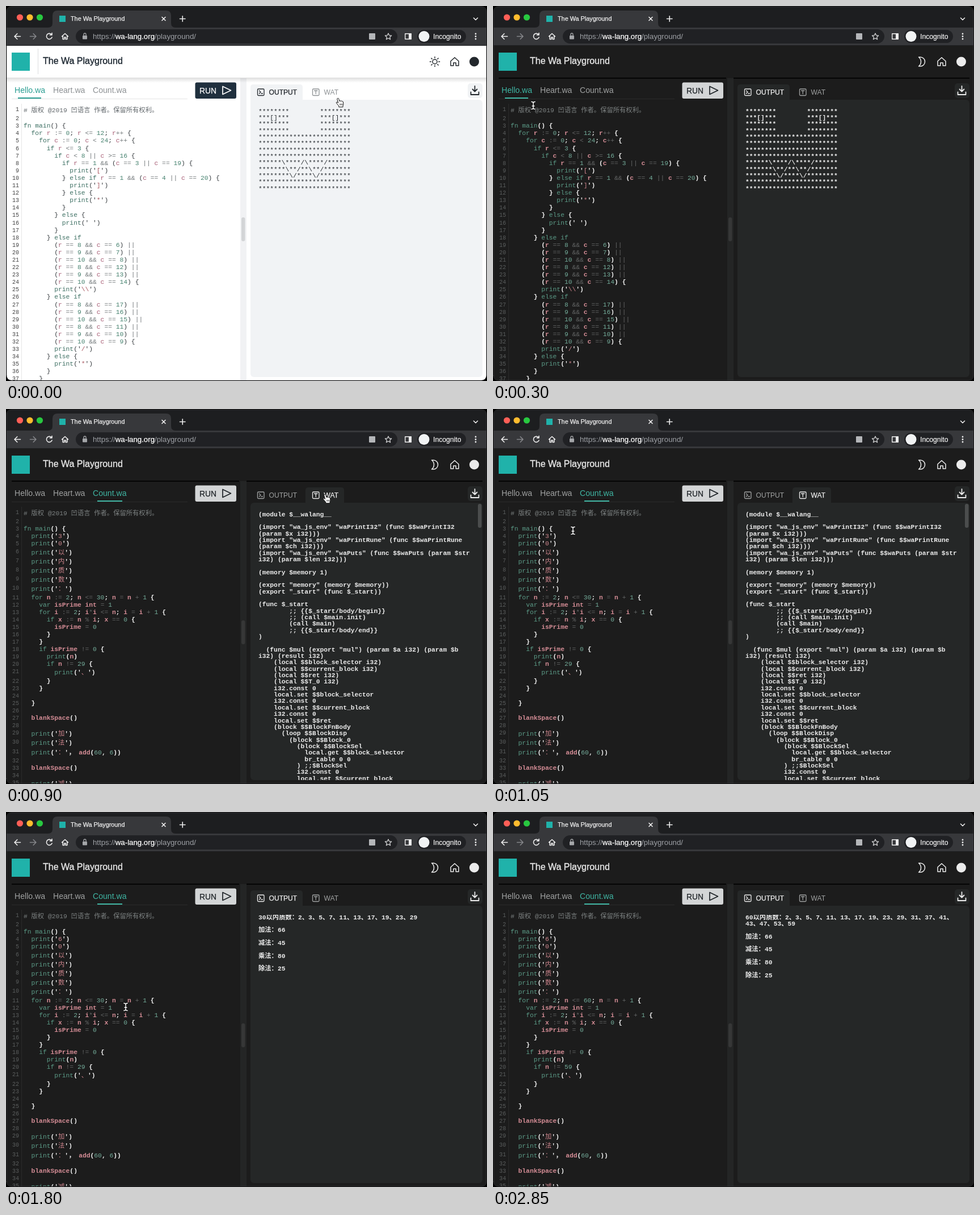
An HTML page for the animation above (3 s loop, 848x660 px).

```html
<!DOCTYPE html>
<html lang="en">
<head>
<meta charset="utf-8">
<title>The Wa Playground</title>
<style>
html, body { margin: 0; width: 100%; height: 100%; overflow: hidden; background: #000; }
#stage {
  position: relative; width: 848px; height: 660px; overflow: hidden; background: #000;
  --page: #fff; --gut: #f1f2f4; --panel: #f1f3f5; --handle: #d3d5d7; --ink: #22272c; --title: #1f2933;
  --dim: #8d9194; --accent: #2a9d92; --run: #20303e; --runInk: #fff; --rule: #e6e6e6;
  --num: #444; --com: #62686c; --key: #3c6f62; --id: #a65a72; --int: #46826f; --op: #72787a;
  --str: #a8525c; --pun: #33383c; --strong: 400;
}
#stage.dark {
  --page: #1c1c1c; --gut: #242525; --panel: #252727; --handle: #363737; --ink: #ececec; --title: #e6e6e6;
  --dim: #a0a2a2; --accent: #3fb5a3; --run: #d3d5d6; --runInk: #1d2226; --rule: #2b2b2b;
  --num: #5b5e5e; --com: #7d8282; --key: #5c9c88; --id: #d58d96; --int: #74ad9b; --op: #646666;
  --str: #cf858d; --pun: #f0f0f0; --strong: 700;
}
svg { position: absolute; left: 0; top: 0; }
svg text { font-family: "Liberation Sans", Arial, sans-serif; white-space: pre; }
.moon { display: none; }
.dark .light { display: none; } .dark .moon { display: inline; }
.line { fill: none; stroke-linecap: round; stroke-linejoin: round; }
#code, #out {
  position: absolute; overflow: hidden; white-space: pre;
  font: 11.3px "Liberation Mono", "Noto Sans CJK SC", "Noto Sans CJK", monospace;
}
#code { left: 0; top: 176px; width: 412px; height: 483px; }
#code div { position: relative; padding-left: 31px; height: 13.1px; line-height: 13.1px; }
#code div.tall { height: 16.2px; line-height: 16px; }
#code i { position: absolute; left: 0; width: 23px; text-align: right; font-style: normal; font-size: 10px; color: var(--num); }
#code .tall i { line-height: 14px; }
#out {
  left: 445px; top: 180.5px; width: 388px; height: 472px; line-height: 11.34px;
  color: var(--ink); font-weight: var(--strong);
}
.com { color: var(--com); } .key { color: var(--key); } .int { color: var(--int); }
.op { color: var(--op); } .str { color: var(--str); }
.id { color: var(--id); font-weight: var(--strong); }
.pun { color: var(--pun); font-weight: var(--strong); }
</style>
</head>
<body>
<div id="stage">
<svg width="848" height="660" viewBox="0 0 848 660">
  <defs>
    <clipPath id="win"><rect x="1" y="1" width="846" height="658" rx="9"/></clipPath>
    <linearGradient id="fade" x2="0" y2="1">
      <stop offset="0" stop-color="#000" stop-opacity=".13"/><stop offset="1" stop-color="#000" stop-opacity="0"/>
    </linearGradient>
  </defs>
  <g clip-path="url(#win)">
    <rect width="848" height="70" fill="#1d1e20"/>
    <path d="M74 38q8 0 8-8V17q0-9 9-9h191q9 0 9 9v13q0 8 8 8h549v31H0V38z" fill="#37383b"/>
    <circle cx="24.5" cy="20" r="5.6" fill="#ff5f57"/>
    <circle cx="42" cy="20" r="5.6" fill="#febc2e"/>
    <circle cx="59.5" cy="20" r="5.6" fill="#28c840"/>
    <rect x="94" y="17" width="11" height="11" fill="#20b2aa"/>
    <text x="114" y="26" font-size="10.85" fill="#f4f4f4" stroke="#f4f4f4" stroke-width=".25">The Wa Playground</text>
    <g class="line" stroke="#eee" stroke-width="1.6">
      <path d="M275 19.5l6 6m0-6l-6 6M306.5 22.5h9.5m-4.75-4.75v9.5M824.5 21l3.5 3.5 3.5-3.5"/>
      <path d="M25.5 53.5h-10.500m4.800-4.800l-4.800 4.800 4.800 4.800"/>
      <path d="M42.5 53.5h10.500m-4.800-4.800l4.800 4.800-4.800 4.800" stroke="#85868a"/>
      <path d="M80.5 50.500a5 5 0 1 0 .6 4.500M81 47.500v3.500h-3.500"/>
      <path d="M98.5 53.500l5.500-5 5.500 5m-9.300-1v6h2.600v-3.500h2.400v3.500h2.600v-6"/>
    </g>
    <rect x="123" y="41" width="567" height="25" rx="12.5" fill="#202124"/>
    <rect x="135" y="52" width="8" height="6.5" rx="1" fill="#a4a6a9"/>
    <path d="M137 52v-2a2 2 0 0 1 4 0v2" class="line" stroke="#a4a6a9" stroke-width="1.3"/>
    <text x="153" y="58" font-size="13.26" fill="#9ea1a6">https://<tspan fill="#fff" stroke="#fff" stroke-width=".25">wa-lang.org</tspan>/playground/</text>
    <rect x="640" y="48" width="11" height="11" rx="1" fill="#b4b6b9"/>
    <path d="M674 48l1.7 3.7 4 .4-3 2.7.9 4-3.6-2.1-3.6 2.1.9-4-3-2.700 4-.4z" class="line" stroke="#d8d9da" stroke-width="1.2"/>
    <rect x="703.7" y="48.7" width="10.6" height="9.6" class="line" stroke="#eee" stroke-width="1.4"/>
    <path d="M710 48.5h4.5v10h-4.5z" fill="#eee"/>
    <rect x="725" y="42" width="86" height="23" rx="11.5" fill="#202124"/>
    <circle cx="737" cy="53.5" r="9.5" fill="#f1f3f4"/>
    <text x="753" y="58" font-size="12.2" fill="#f4f4f4" stroke="#f4f4f4" stroke-width=".2">Incognito</text>
    <g fill="#eee"><circle cx="828" cy="49" r="1.4"/><circle cx="828" cy="53.5" r="1.4"/><circle cx="828" cy="58" r="1.4"/></g>

    <rect y="70" width="848" height="590" fill="var(--page)"/>
    <rect x="413" y="127" width="11" height="533" fill="var(--gut)"/>
    <rect class="light" y="126" width="848" height="9" fill="url(#fade)"/>
    <path class="moon" d="M10 127h401M424 127h416" stroke="#050505" stroke-width="2"/>
    <rect x="10" y="82" width="32" height="32" fill="#20b2aa"/>
    <path class="light" d="M56.5 75v45" stroke="#dcdedf"/>
    <text x="65" y="102" font-size="16" fill="var(--title)" stroke="var(--title)" stroke-width=".4">The Wa Playground</text>
    <g class="line" stroke="var(--ink)" stroke-width="1.5">
      <g class="light"><circle cx="756" cy="98" r="4"/><path id="rays"/></g>
      <path class="moon" d="M750.5 90h3a8 8 0 0 1 0 16h-3a10 10 0 0 0 0-16z"/>
      <path d="M784 97l7-6.3 7 6.3v8h-4.800v-5h-4.400v5h-4.800z"/>
    </g>
    <circle cx="825.5" cy="98" r="8.5" fill="var(--ink)"/>

    <path d="M10 163.5h310" stroke="var(--rule)"/>
    <path d="M27.5 172v488" stroke="var(--rule)"/>
    <g id="files" font-size="14.1"></g>
    <rect id="under" y="161" height="2" fill="var(--accent)"/>
    <rect x="333.5" y="134.5" width="72.5" height="28.5" rx="3" fill="var(--run)"/>
    <text x="341" y="153.5" font-size="13.9" fill="var(--runInk)" stroke="var(--runInk)" stroke-width=".25">RUN</text>
    <path d="M382 141.5v14l14.5-7z" class="line" stroke="var(--runInk)" stroke-width="1.7"/>
    <rect x="415" y="372" width="6.5" height="42" rx="3" fill="var(--handle)"/>

    <rect x="431" y="165" width="409" height="488" rx="6" fill="var(--panel)"/>
    <path id="pane" fill="var(--panel)"/>
    <g id="views" font-size="12.1"></g>
    <rect x="814" y="136" width="26" height="26" rx="5" fill="var(--panel)"/>
    <path d="M826.5 141v9.500m-4-4l4 4 4-4M819.5 151.500v4.500h14v-4.500" class="line" stroke="var(--ink)" stroke-width="1.8"/>
    <rect id="bar" x="832" y="167" width="6.5" height="42" rx="3" fill="#4b4d4d"/>
  </g>
</svg>
<div id="code"></div>
<div id="out"></div>
<svg width="848" height="660" viewBox="0 0 848 660">
  <path d="M1 651v-641q0-9 9-9h828q9 0 9 9v640q0 9-9 9H10q-9 0-9-9z" fill="none" stroke="#4a4b4d" stroke-opacity=".55"/>
  <g id="hand">
    <path d="M-3.5-7.500q1.700-.8 2.200.9l1.100 4q1.200-1.200 2.300 0 1.400-.9 2.300.4 1.600-.5 2 1.100l.4 3.300q.1 1.900-.8 3.300v2.300H-1.200v-1.900l-4-4.700q-1.300-1.900.5-2.300l2.300 1.600-1.800-6.600q-.2-1 .7-1.400z" fill="#fff" stroke="#111"/>
    <path d="M.8 1.800v3m2-3v3m2-3v3" stroke="#111" stroke-width=".8"/>
  </g>
  <g id="beam" class="line"></g>
</svg>
</div>
<script>
const $ = id => document.getElementById(id);
const esc = s => s.replace(/&/g, '&amp;').replace(/</g, '&lt;');
const HEAD = '# 版权 @2019 凹语言 作者。保留所有权利。\n\nfn main() {\n';

const marks = rows => rows.map(([r, c], i) =>
  `        (r == ${r} && c == ${c}) ` + (i < rows.length - 1 ? '||' : '{')).join('\n');
const backs = [[8, 6], [9, 7], [10, 8], [8, 12], [9, 13], [10, 14]];
const slashes = [[8, 17], [9, 16], [10, 15], [8, 11], [9, 10], [10, 9]];

const hello = HEAD + `  for r := 0; r <= 12; r++ {
    for c := 0; c < 24; c++ {
      if r <= 3 {
        if c < 8 || c >= 16 {
          if r == 1 && (c == 3 || c == 19) {
            print('[')
          } else if r == 1 && (c == 4 || c == 20) {
            print(']')
          } else {
            print('*')
          }
        } else {
          print(' ')
        }
      } else if
${marks(backs)}
        print('\\\\')
      } else if
${marks(slashes)}
        print('/')
      } else {
        print('*')
      }
    }`;

const count = (tens, limit, last) => HEAD +
  [tens, '0', ...'以内质数：'].map(c => `  print('${c}')\n`).join('') +
`  for n := 2; n <= ${limit}; n = n + 1 {
    var isPrime int = 1
    for i := 2; i*i <= n; i = i + 1 {
      if x := n % i; x == 0 {
        isPrime = 0
      }
    }
    if isPrime != 0 {
      print(n)
      if n != ${last} {
        print('、')
      }
    }

  }

  blankSpace()

  print('加')
  print('法')
  print('：'， add(60, 6))

  blankSpace()

  print('减')`;

function face() {
  const has = (list, r, c) => list.some(p => p[0] === r && p[1] === c);
  const cell = (r, c) => {
    if (r < 4 && c > 7 && c < 16) return ' ';
    if (r === 1 && c % 16 === 3) return '[';
    if (r === 1 && c % 16 === 4) return ']';
    return has(backs, r, c) ? '\\' : has(slashes, r, c) ? '/' : '*';
  };
  return Array.from({ length: 13 }, (_, r) =>
    Array.from({ length: 24 }, (_, c) => cell(r, c)).join('')).join('\n');
}

function primes(max) {
  const list = [];
  for (let n = 2; n <= max; n++) if (list.every(p => n % p)) list.push(n);
  const text = list.join('、').replace('41、', '41、\n');
  return `${max}以内质数：${text}\n\n加法：66\n\n减法：45\n\n乘法：80\n\n除法：25`;
}

const wat = name => `(module $__walang__

(import "wa_js_env" "waPrintI32" (func $$waPrintI32
(param $x i32)))
(import "wa_js_env" "waPrintRune" (func $$waPrintRune
(param $ch i32)))
(import "wa_js_env" "waPuts" (func $$waPuts (param $str
i32) (param $len i32)))

(memory $memory 1)

(export "memory" (memory $memory))
(export "_start" (func $_start))

(func $_start
        ;; {{$_start/body/begin}}
        ;; (call $main.init)
        (call $main)
        ;; {{$_start/body/end}}
)

  (func $${name} (export "${name}") (param $a i32) (param $b
i32) (result i32)
    (local $$block_selector i32)
    (local $$current_block i32)
    (local $$ret i32)
    (local $$T_0 i32)
    i32.const 0
    local.set $$block_selector
    i32.const 0
    local.set $$current_block
    i32.const 0
    local.set $$ret
    (block $$BlockFnBody
      (loop $$BlockDisp
        (block $$Block_0
          (block $$BlockSel
            local.get $$block_selector
            br_table 0 0
          ) ;;$BlockSel
          i32.const 0
          local.set $$current_block`;

const TOKEN = /(#.*)|('[^']*')|\b(fn|for|if|else|var|print|main)\b|(\d+)|([a-zA-Z]\w*)|([=<>!&|+*%:]+)|([^\s\w])/g;
const KINDS = ['com', 'str', 'key', 'int', 'id', 'op', 'pun'];
const span = (kind, text) => `<span class="${kind}">${esc(text)}</span>`;
const quote = span('pun', "'");
const paint = line => line.replace(TOKEN, (all, ...g) => {
  const kind = KINDS[g.findIndex(x => x !== undefined)];
  return kind === 'str' ? quote + span(kind, all.slice(1, -1)) + quote : span(kind, all);
});
const showCode = text => text.split('\n').map((line, i) =>
  `<div${/[^\x00-\x7f]/.test(line) ? ' class="tall"' : ''}><i>${i + 1}</i>${paint(line)}</div>`).join('');

// Label, its x, then x and width of its underline.
const FILES = [['Hello.wa', 15, 21, 41], ['Heart.wa', 83, 89, 44], ['Count.wa', 153, 161, 44]];
function showFiles(active) {
  $('files').innerHTML = FILES.map(([name, x], i) =>
    `<text x="${x}" y="153" fill="var(--${i === active ? 'accent' : 'dim'})">${name}</text>`).join('');
  $('under').setAttribute('x', FILES[active][2]);
  $('under').setAttribute('width', FILES[active][3]);
}

function showViews(isWat) {
  const view = (name, x, sign, on) => {
    const c = `var(--${on ? 'ink' : 'dim'})`;
    return `<g class="line" stroke="${c}" stroke-width="1.3"><rect x="${x}" y="146" width="11.5" height="11.5" rx="1.5"/>
      <path d="M${x + 3} 149${sign}"/></g>
      <text x="${x + 20}" y="156" fill="${c}" stroke="${c}" stroke-width="${on ? .25 : 0}">${name}</text>`;
  };
  $('views').innerHTML = view('OUTPUT', 443.5, 'l2.5 2.5-2.5 2.5m3.5 0h2.5', !isWat) +
    view('WAT', 540.5, 'h5.5m-2.75 0v5.5', isWat);
  const [x, w] = isWat ? [528, 68] : [431, 92];
  $('pane').setAttribute('d', `M${x} 172v-29q0-5 5-5h${w - 10}q5 0 5 5v29z`);
}

$('rays').setAttribute('d', Array.from({ length: 8 }, (_, i) => {
  const a = i * Math.PI / 4, at = r => `${756 + r * Math.cos(a)} ${98 + r * Math.sin(a)}`;
  return `M${at(6.8)}L${at(8.6)}`;
}).join(''));

const BEAM = 'M-3.2-6.5q3.2 0 3.2 2.2 0-2.2 3.2-2.2M-3.2 6.5q3.2 0 3.2-2.2 0 2.2 3.2 2.2M0-4.3v8.6M-2 1h4';
$('beam').innerHTML = [['#111', 3], ['#fff', 1.4]].map(([c, w]) =>
  `<path d="${BEAM}" stroke="${c}" stroke-width="${w}"/>`).join('');

// Each step lists what changes and the pointer: kind, x, y.
const STEP = 150, LOOP = 3000;
const STEPS = [
  [{ dark: false, file: 0, code: hello, wat: false, out: face(), bar: false }, 'hand', 588, 170],
  [{}, 'hand', 757, 104],
  [{ dark: true }, 'beam', 71, 175],
  [{}, 'hand', 112, 155],
  [{ file: 2, code: count('3', '30', '29'), out: primes(30) }, 'hand', 182, 155],
  [{}, 'beam', 671, 240],
  [{ wat: true, out: wat('mul'), bar: true }, 'hand', 565, 158],
  [{}, 'beam', 141, 214],
  [{ bar: false }, 'hand', 370, 152],
  [{ out: wat('sub') }, 'hand', 538, 170],
  [{ wat: false, out: primes(30) }, 'hand', 480, 158],
  [{ code: count('', '30', '29') }, 'beam', 262, 366],
  [{ code: count('6', '30', '29') }, 'beam', 211, 343],
  [{ code: count('6', '0', '29') }, 'beam', 178, 340],
  [{ code: count('6', '60', '29') }, 'beam', 150, 452],
  [{ code: count('6', '60', '9') }, 'beam', 150, 456],
  [{ code: count('6', '60', '59') }, 'beam', 357, 171],
  [{ out: primes(60) }, 'hand', 372, 152],
  [{}], [{}]
];
let acc = {};
const SCENES = STEPS.map(([change, kind, x, y]) => {
  acc = { ...acc, ...change };
  return { ...acc, kind, x, y };
});

function render(s) {
  $('stage').classList.toggle('dark', s.dark);
  showFiles(s.file);
  showViews(s.wat);
  $('code').innerHTML = showCode(s.code);
  $('out').textContent = s.out;
  $('bar').style.display = s.bar ? '' : 'none';
  for (const id of ['hand', 'beam']) {
    $(id).style.display = s.kind === id ? '' : 'none';
    if (s.kind === id) $(id).setAttribute('transform', `translate(${s.x} ${s.y})`);
  }
}

let shown = -1;
const start = performance.now();
function tick() {
  const i = Math.floor((performance.now() - start) % LOOP / STEP);
  if (i !== shown) render(SCENES[shown = i]);
  requestAnimationFrame(tick);
}
tick();
</script>
</body>
</html>
```
